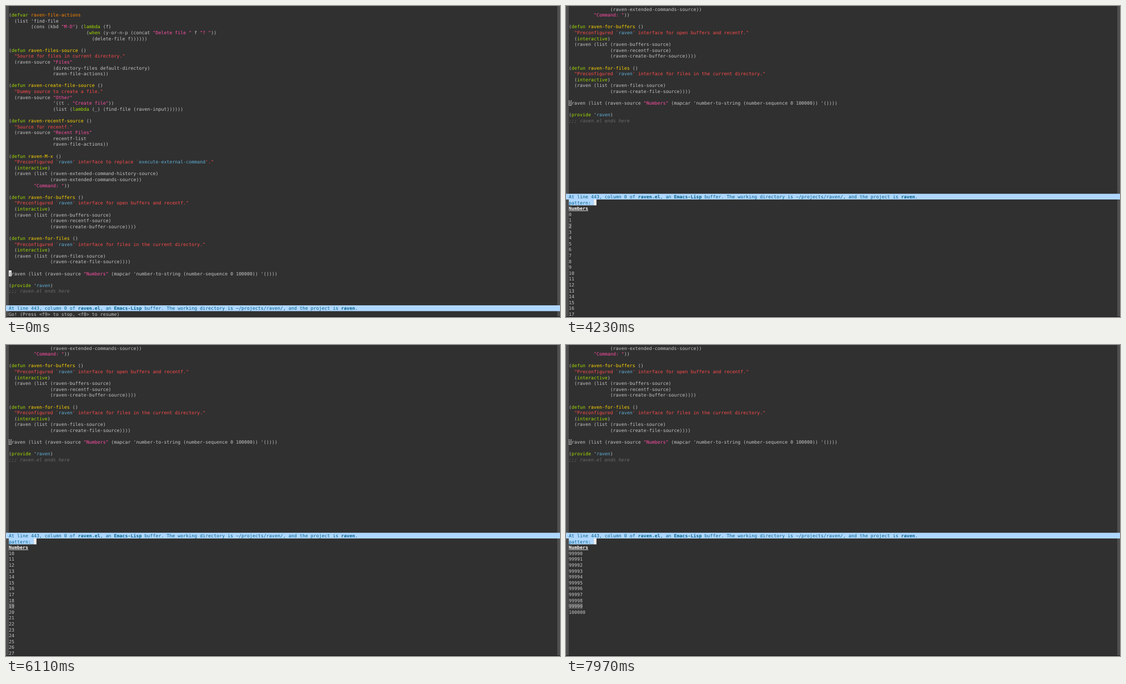
An HTML page for the animation above (8 s loop, 998x561 px).

```html
<!DOCTYPE html>
<html lang="en">
<head>
<meta charset="utf-8">
<title>Filtering candidates in Emacs</title>
<style>
  :root { --row: 106px; --bg: #303030; --fringe: #4e4e4e; --bar: #afd7ff; --ink: #005f87; }
  html, body { margin: 0; width: 100%; height: 100%; overflow: hidden; background: var(--bg); }
  /* Laid out at ten times the size, so that fractional rows keep soft edges when scaled down. */
  #stage {
    position: absolute; left: 0; top: 0; width: 9980px; height: 5610px; overflow: hidden;
    transform: scale(.1); transform-origin: 0 0; color: #c6c6c6;
    font: 82.88px "DejaVu Sans Mono", monospace; white-space: pre;
    text-rendering: geometricPrecision; font-variant-ligatures: none;
  }
  #stage, #dock {
    background: linear-gradient(90deg, var(--fringe) 50px, var(--bg) 50px 9930px, var(--fringe) 9930px);
  }
  #stage::after { content: ""; position: absolute; left: 0; right: 0; bottom: 0; height: 10px; background: #1c1c1c; }
  #code { position: absolute; left: 0; margin: 0; font: inherit; }
  #dock { position: absolute; left: 0; right: 0; bottom: 0; overflow: hidden; }
  .row { height: var(--row); line-height: 114px; padding-left: 50px; }
  .cell { display: inline-block; height: var(--row); vertical-align: top; }
  .mode, .prompt { background: var(--bar); color: var(--ink); }
  .block { background: #eee; color: var(--bg); }
  .hollow { box-shadow: inset 0 0 0 6px #eee; }
  .hit { background: var(--fringe); }
  .title { color: #fff; font-weight: bold; text-decoration: underline 8px; text-underline-offset: 8px; }
  .keyword { color: #a1db00; }
  .function { color: #ffd700; }
  .variable { color: #ff8700; }
  .constant { color: #5fafd7; }
  .string { color: #ff4ea3; }
  .doc { color: #ff4b4b; }
  .comment { color: #6c6c6c; font-style: italic; }
  .light { color: #eee; }
</style>
</head>
<body>
<div id="stage">
<pre id="code">

(defvar raven-file-actions
  (list 'find-file
        (cons (kbd "M-D") (lambda (f)
                            (when (y-or-n-p (concat "Delete file " f "? "))
                              (delete-file f))))))

(defun raven-files-source ()
  "Source for files in current directory."
  (raven-source "Files"
                (directory-files default-directory)
                raven-file-actions))

(defun raven-create-file-source ()
  "Dummy source to create a file."
  (raven-source "Other"
                '((t . "Create file"))
                (list (lambda (_) (find-file (raven-input))))))

(defun raven-recentf-source ()
  "Source for recentf."
  (raven-source "Recent Files"
                recentf-list
                raven-file-actions))

(defun raven-M-x ()
  "Preconfigured `raven' interface to replace `execute-external-command'."
  (interactive)
  (raven (list (raven-extended-command-history-source)
               (raven-extended-commands-source))
         "Command: "))

(defun raven-for-buffers ()
  "Preconfigured `raven' interface for open buffers and recentf."
  (interactive)
  (raven (list (raven-buffers-source)
               (raven-recentf-source)
               (raven-create-buffer-source))))

(defun raven-for-files ()
  "Preconfigured `raven' interface for files in the current directory."
  (interactive)
  (raven (list (raven-files-source)
               (raven-create-file-source))))

(raven (list (raven-source "Numbers" (mapcar 'number-to-string (number-sequence 0 100000)) '())))

(provide 'raven)
;;; raven.el ends here</pre>
<div id="dock"></div>
</div>
<script>
const LOOP = 8000, ROW = 106, COUNT = 100001, VISIBLE = 18, LEAD = 9;
const code = document.getElementById('code');
const dock = document.getElementById('dock');

const span = (cls, text) => `<span class="${cls}">${text}</span>`;
const row = (html, cls = '') => `<div class="row ${cls}">${html}</div>`;

const TOKEN = new RegExp([
  '(?<string>"[^"]*")',
  '(?<comment>;;;.*)',
  '(?<function>(?<=\\(defun )\\S+)',
  '(?<variable>(?<=\\(defvar )\\S+)',
  "(?<constant>(?<=provide ')raven)",
  '(?<keyword>\\b(?:defun|defvar|lambda|when|interactive|provide)\\b)'
].join('|'), 'g');

function highlight(line) {
  if (line.startsWith('  "'))
    return span('doc', line.replace(/`([^']+)'/g, (_, name) => '`' + span('constant', name) + "'"));
  const html = line.replace(TOKEN, (text, ...rest) => {
    const groups = rest.at(-1);
    return span(Object.keys(groups).find(key => groups[key]), text);
  });
  return line.startsWith('(raven ') ? '<span id="point" class="cell">(</span>' + html.slice(1) : html;
}

code.innerHTML = code.textContent.split('\n').map(line => row(highlight(line))).join('');
const point = document.getElementById('point');

const modeLine = row('At line 443, column 0 of <b>raven.el</b>, an <b>Emacs-Lisp</b> buffer. ' +
  'The working directory is ~/projects/raven/, and the project is <b>raven</b>.', 'mode');
const greeting = row('Go! (Press &lt;f9&gt; to stop, &lt;f8&gt; to resume)');
const menu = row(span('cell hollow', 'Q') + 'uinine &gt; ELisp IDE: [' + span('constant', 'e') +
  ']: eval, [' + span('light', 'i') + ']: expression.');
const prompt = row(span('cell prompt', 'pattern: ') + span('cell block', ' '));

// Evenly spaced key repeats on a 10 ms clock.
const repeat = (from, to, n) =>
  Array.from({ length: n }, (_, i) => Math.round((from + (to - from) * i / (n - 1)) / 10) * 10);

const presses = [
  ...repeat(4230, 4520, 9), ...repeat(4560, 4940, 11),
  5160, 6110, 6140, 6180, 6360, ...repeat(6520, 6780, 3),
  7440, ...repeat(7480, 7970, 14)
];

// Twenty presses down, then up past zero, wrapping to the end of the list.
function selectionAt(time) {
  const n = presses.filter(press => press <= time).length;
  return ((n <= 20 ? 1 + n : 41 - n) + COUNT) % COUNT;
}

function candidates(selected) {
  const first = Math.max(0, selected - LEAD);
  const last = Math.min(COUNT, first + VISIBLE);
  let html = row(span('title', 'Numbers'));
  for (let n = first; n < last; n++) html += row(n === selected ? span('cell hit', n) : n);
  return html;
}

function sceneAt(time) {
  if (time < 100) return { rows: 2, html: greeting };
  if (time < 160) return { rows: 2, html: '' };
  if (time < 3280) return { rows: 3, html: menu };
  const list = time < 3580 ? '' : candidates(selectionAt(time));
  return { rows: 21, html: prompt + list, scroll: 29 };
}

let shown = null;
function render(time) {
  const { rows, html, scroll = 0 } = sceneAt(time);
  const key = rows + html;
  if (key === shown) return;
  shown = key;
  code.style.top = -scroll * ROW + 'px';
  point.className = 'cell ' + (scroll ? 'hollow' : 'block');
  dock.style.height = rows * ROW + 'px';
  dock.innerHTML = modeLine + html;
}

const start = performance.now();
function tick() {
  render((performance.now() - start) % LOOP);
  requestAnimationFrame(tick);
}
tick();
</script>
</body>
</html>
```
